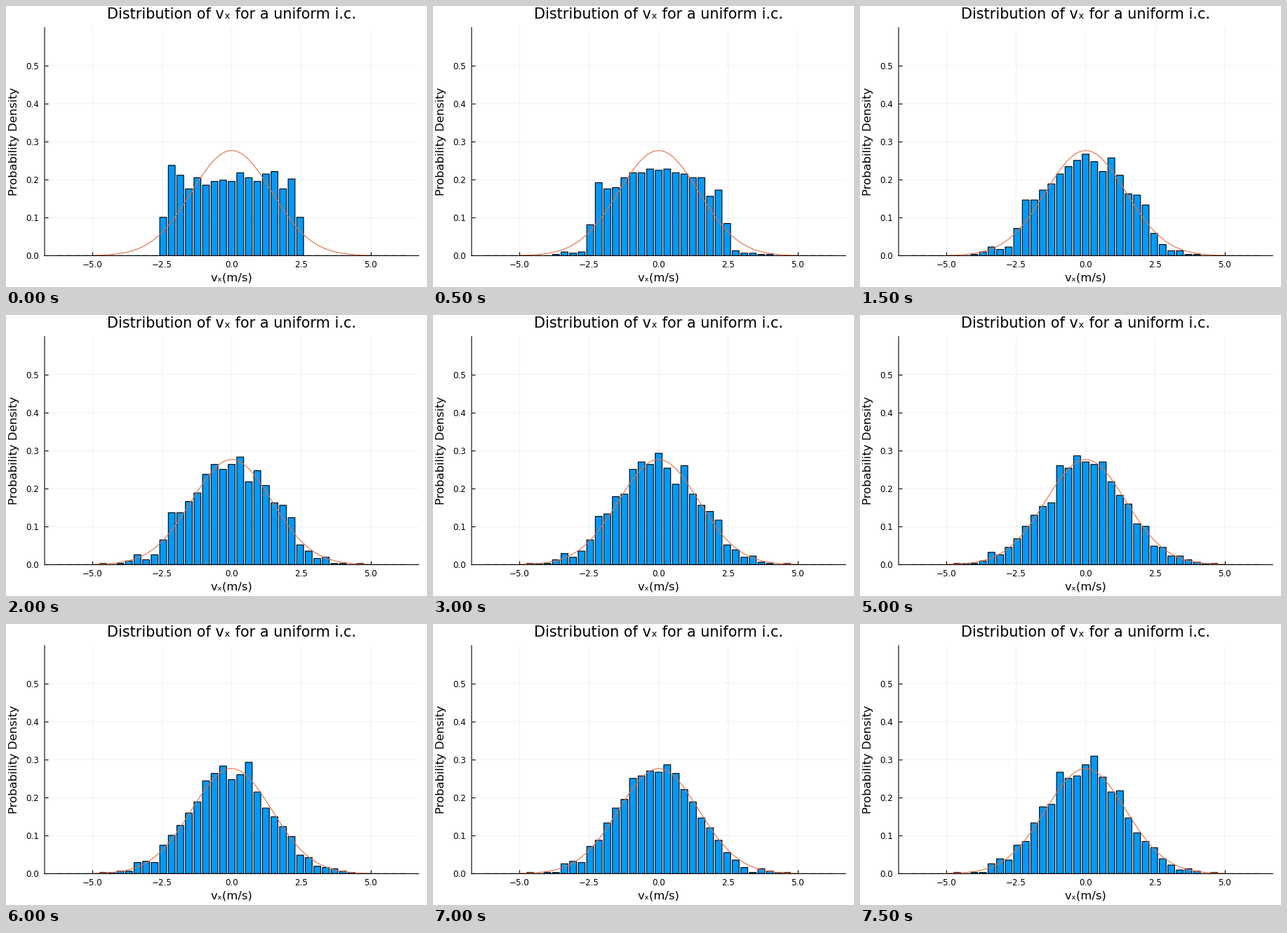
A matplotlib script that plays this animation: 600x400 px, repeating every 8000 ms.

```python
import matplotlib.pyplot as plt
import numpy as np
from matplotlib.animation import FuncAnimation

W, H, DPI = 600, 400, 100
STEPS, STEP_MS = 16, 500
PARTICLES, BIN = 1024, 0.3
SPACING = 12 / 39
BINS = np.arange(-20, 21)
SIGMA = 1.443
EDGE = 8.05      # half width of the uniform start, in bins
RELAX = 2.8      # steps for the start shape to fade by 1/e
MEMORY = 0.85    # share of the noise kept from step to step
ROUGHNESS = 0.7

plt.rcParams["font.family"] = "DejaVu Sans"
plt.rcParams["path.snap"] = False


def gauss(v):
    return np.exp(-v**2 / (2 * SIGMA**2)) / (SIGMA * np.sqrt(2 * np.pi))


def simulate():
    """Bar heights per step: a uniform start relaxing to the normal curve."""
    rng = np.random.default_rng(5)
    start = PARTICLES / (2 * EDGE) * np.clip(EDGE + 0.5 - abs(BINS), 0, 1)
    settled = PARTICLES * BIN * gauss(BINS * SPACING)
    noise = rng.standard_normal(BINS.size)
    rows = []
    for step in range(STEPS):
        mean = settled + (start - settled) * np.exp(-step / RELAX)
        counts = np.round(mean + ROUGHNESS * np.sqrt(mean) * noise)
        rows.append(np.maximum(counts, 0) / (PARTICLES * BIN))
        fresh = rng.standard_normal(BINS.size)
        noise = MEMORY * noise + np.sqrt(1 - MEMORY**2) * fresh
    return rows


HEIGHTS = simulate()

fig = plt.figure(figsize=(W / DPI, H / DPI), dpi=DPI, facecolor="white")

left, right, top, bottom = 55, 588.2, 30.7, 355.4
mid = (left + right) / 2
ax = fig.add_axes([left / W, 1 - bottom / H, (right - left) / W, (bottom - top) / H])
ax.set_xlim(-6.724, 6.724)
ax.set_ylim(0, 0.6)
ax.spines[["top", "right"]].set_visible(False)
ax.spines[["left", "bottom"]].set_linewidth(0.8)
ax.set_axisbelow(True)
ax.grid(color="black", alpha=0.1, linewidth=0.4)

xticks = np.linspace(-5, 5, 5)
yticks = np.arange(6) / 10
ax.set_xticks(xticks, [f"{x:.1f}".replace("-", "\u2212") for x in xticks])
ax.set_yticks(yticks, [f"{y:.1f}" for y in yticks])
ax.tick_params(direction="in", length=3.6, width=0.8, labelsize=8.57)
ax.tick_params(axis="x", pad=5)
ax.tick_params(axis="y", pad=5.4)


def label(x, y, text, size, angle=0):
    fig.text(x / W, 1 - y / H, text, fontsize=size, rotation=angle,
             rotation_mode="anchor", ha="center", va="baseline")


label(mid - 0.3, 18, "Distribution of v\u2093 for a uniform i.c.", 14.95)
label(mid + 0.3, 391.5, "v\u2093(m/s)", 11.8)
label(15.8, 193.2, "Probability Density", 11.8, 90)

bars = ax.bar(BINS * SPACING, HEIGHTS[0], width=0.8 * SPACING, color="#009AFA",
              edgecolor="black", linewidth=0.8, zorder=2, clip_on=False)
v = np.linspace(-5, 5, 300)
ax.plot(v, gauss(v), color="#E26F46", linewidth=0.8, zorder=3)


def update(step):
    for bar, h in zip(bars, HEIGHTS[step]):
        bar.set_height(h)
    return list(bars)


anim = FuncAnimation(fig, update, frames=STEPS, interval=STEP_MS,
                     repeat=True, repeat_delay=0, blit=False)
plt.show()
```
